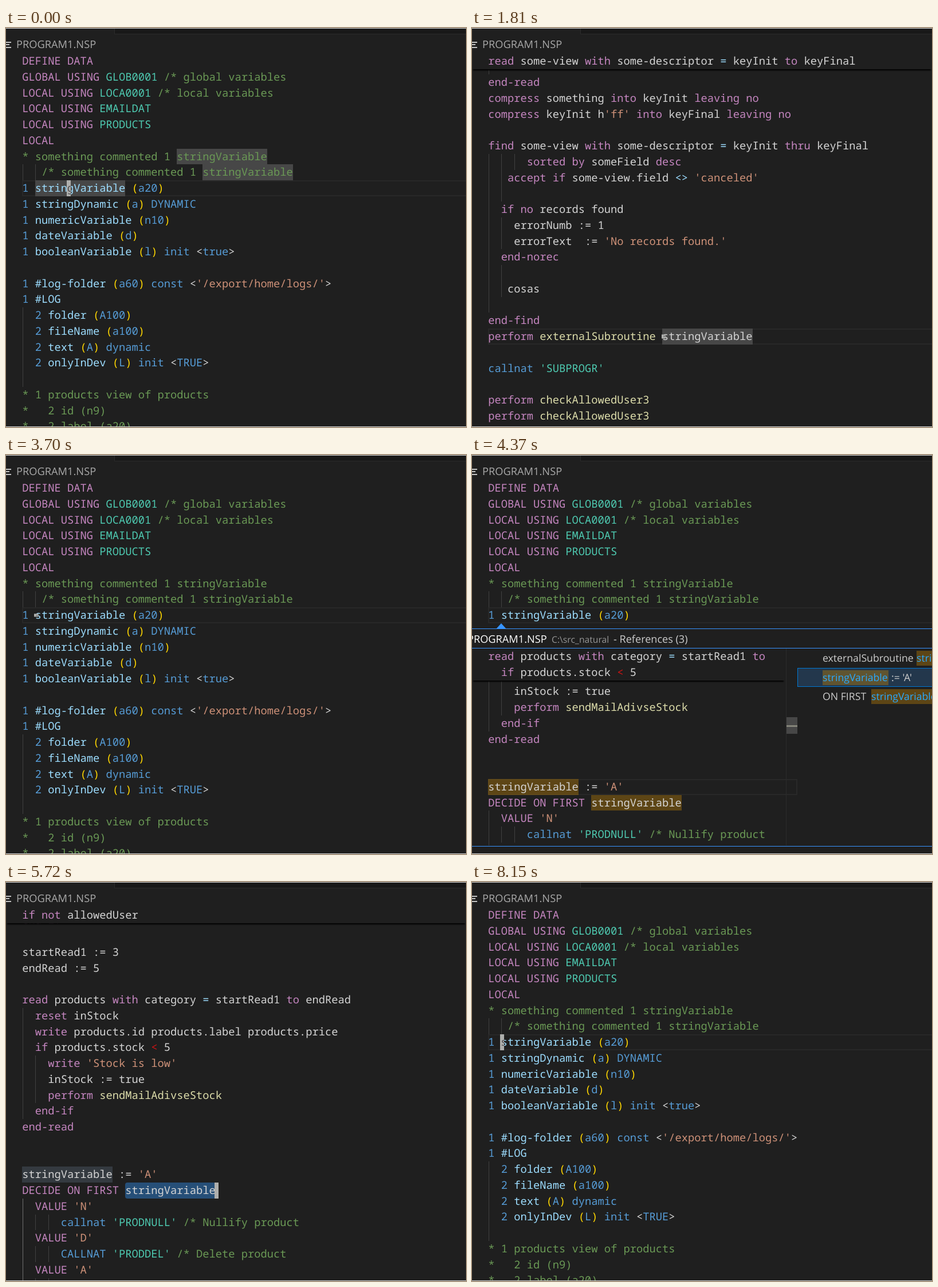
Write an HTML page that moves like this. It is 803 by 697 pixels and loops after 8350 ms.

```html
<!DOCTYPE html>
<html lang="en">
<head>
<meta charset="utf-8">
<title>Find references in an editor</title>
<style>
html, body { margin: 0; width: 100%; height: 100%; overflow: hidden; background: #1f1f1f; }
#stage { position: relative; width: 803px; height: 697px; overflow: hidden; background: #1f1f1f; color: #d4d4d4; }
#stage div, #stage span { position: absolute; box-sizing: border-box; white-space: pre; text-rendering: geometricPrecision; }
.row, .cursor { font: 500 18.75px/27.75px "Noto Sans Mono", monospace; }
.ui { font-family: "Open Sans", sans-serif; line-height: 30px; }
.pane { overflow: hidden; }
.k { color: #c586c0; }
.b { color: #569cd6; }
.v { color: #9cdcfe; }
.t { color: #4ec9b0; }
.s { color: #ce9178; }
.f { color: #dcdcaa; }
.c { color: #6a9955; }
.p { color: #ffd700; }
.r { color: rgba(255, 18, 18, .8); }
.guide { background: #404040; }
.active { background: #707070; }
.current { border: 2px solid #282828; }
.word { background: #474747; }
.same { background: #343a40; }
.selection { background: #264f78; border-radius: 4px; }
.jump { background: rgba(234, 92, 0, .333); }
.match { background: rgba(187, 128, 9, .4); }
.sticky { background: #1f1f1f; box-shadow: 0 4px 2px -2px #000; }
.cursor { background: #aeafad; color: #515052; padding-left: 1px; overflow: hidden; }
.tabs { background: #181818; border: solid #2b2b2b; border-width: 0 0 1px 1px; }
.edge { background: #d8d8d8; }
.icon { background: #c5c5c5; }
.peek { background: #1f1f1f; border: solid #3794ff; border-width: 1px 0; }
.title { border-bottom: 1px solid #3794ff; }
.ruler { border-left: 1px solid #2b2b2b; }
.slider { background: rgba(121, 121, 121, .45); }
.tick { background: #85857a; }
.picked { background: #23374c; border: 1px solid #0078d4; }
.arrow { background: #3794ff; clip-path: polygon(50% 0, 100% 100%, 0 100%); }
</style>
</head>
<body>
<div id="stage"></div>
<script>
const LOOP = 8350, CHAR = 11.25, LINE = 27.75, LEFT = 28.3;
const stage = document.getElementById('stage');

// Markup: "2|" = number of indent guides, x[...] = text in colour class x.
const declarations = [
  'k[DEFINE DATA]',
  'k[GLOBAL USING] t[GLOB0001] c[/* global variables]',
  'k[LOCAL USING] t[LOCA0001] c[/* local variables]',
  'k[LOCAL USING] t[EMAILDAT]',
  'k[LOCAL USING] t[PRODUCTS]',
  'k[LOCAL]',
  'c[* something commented 1 stringVariable]',
  '2|   c[/* something commented 1 stringVariable]',
  'b[1] v[stringVariable] p[(]b[a20]p[)]',
  'b[1] v[stringDynamic] p[(]b[a]p[)] b[DYNAMIC]',
  'b[1] v[numericVariable] p[(]b[n10]p[)]',
  'b[1] v[dateVariable] p[(]b[d]p[)]',
  'b[1] v[booleanVariable] p[(]b[l]p[)] b[init] <b[true]>',
  '',
  "b[1] v[#log-folder] p[(]b[a60]p[)] b[const] <s['/export/home/logs/']>",
  'b[1] v[#LOG]',
  '1|  b[2] v[folder] p[(]b[A100]p[)]',
  '1|  b[2] v[fileName] p[(]b[a100]p[)]',
  '1|  b[2] v[text] p[(]b[A]p[)] b[dynamic]',
  '1|  b[2] v[onlyInDev] p[(]b[L]p[)] b[init] <b[TRUE]>',
  '1|',
  'c[* 1 products view of products]',
  'c[*   2 id (n9)]',
  'c[*   2 label (a20)]'
];
const calls = [
  '1|',
  'k[end-read]',
  'k[compress] something k[into] keyInit k[leaving no]',
  "k[compress] keyInit hs['ff'] k[into] keyFinal k[leaving no]",
  '',
  'k[find] some-view k[with] some-descriptor v[=] keyInit k[thru] keyFinal',
  '3|      k[sorted by] someField k[desc]',
  "2|   k[accept if] some-view.field v[<>] s['canceled']",
  '2|',
  '1|  k[if no] records found',
  '2|    errorNumb := 1',
  "2|    errorText  := s['No records found.']",
  '1|  k[end-norec]',
  '2|',
  '2|   cosas',
  '1|',
  'k[end-find]',
  'k[perform] f[externalSubroutine] stringVariable',
  '',
  "b[callnat] t['SUBPROGR']",
  '',
  'k[perform] f[checkAllowedUser3]',
  'k[perform] f[checkAllowedUser3]'
];
const stock = [
  'k[end-if]',
  '',
  'startRead1 := 3',
  'endRead := 5',
  '',
  'k[read] products k[with] category v[=] startRead1 k[to] endRead',
  '1|  k[reset] inStock',
  '1|  k[write] products.id products.label products.price',
  '1|  k[if] products.stock r[<] 5',
  "2|    k[write] s['Stock is low']",
  '2|    inStock := true',
  '2|    k[perform] f[sendMailAdivseStock]',
  '1|  k[end-if]',
  'k[end-read]',
  '',
  '',
  "stringVariable := s['A']",
  'k[DECIDE ON FIRST] stringVariable',
  "1|  k[VALUE] s['N']",
  "3|      b[callnat] t['PRODNULL'] c[/* Nullify product]",
  "1|  k[VALUE] s['D']",
  "3|      b[CALLNAT] t['PRODDEL'] c[/* Delete product]",
  "1|  k[VALUE] s['A']",
  '3|'
];

function box(parent, cls, x, y, w, h, text = '') {
  const el = document.createElement('div');
  el.className = cls;
  el.style.cssText = `left:${x}px;top:${y}px;width:${w}px;height:${h}px`;
  el.textContent = text;
  return parent.appendChild(el);
}

function label(parent, x, middle, size, text, color) {
  const el = box(parent, 'ui', x, middle - 15, 300, 30, text);
  el.style.fontSize = size + 'px';
  el.style.color = color;
}

// Every block of code starts at `top`, the upper edge of its first row.
function code(parent, rows, top) {
  rows.forEach((row, i) => {
    const [, guides, markup] = row.match(/^(?:(\d)\|)?(.*)$/);
    for (let g = 0; g < (guides || 0); g++) guide(parent, top, i, 1, g, 'guide');
    const line = box(parent, 'row', LEFT, top + i * LINE, 0, LINE);
    let col = 0;
    for (const [, cls, colored, plain] of markup.matchAll(/([a-z])\[(.*?)\]|((?:(?![a-z]\[).)+)/g)) {
      const span = line.appendChild(document.createElement('span'));
      span.className = cls || '';
      span.textContent = colored || plain;
      span.style.left = col * CHAR + 'px';
      col += span.textContent.length;
    }
  });
}

function guide(parent, top, row, count, depth, cls) {
  return box(parent, cls, Math.round(28.6 + depth * 2 * CHAR), top + row * LINE, 1, count * LINE);
}

function mark(parent, cls, top, row, col, length = 14) {
  return box(parent, cls, LEFT + col * CHAR, top + row * LINE, length * CHAR, LINE);
}

function currentLine(parent, top, row, width = 800) {
  return box(parent, 'current', 28, top + row * LINE, width, LINE);
}

function play(el, frames) {
  el.animate(frames, { duration: LOOP, iterations: Infinity });
}

function during(el, ...spans) {
  const key = (time, opacity) => ({ offset: time / LOOP, opacity, easing: 'step-end' });
  const frames = spans.flatMap(([from, to]) => [key(from, 1), key(to, 0)]);
  if (spans[0][0] > 0) frames.unshift(key(0, 0));
  play(el, [...frames, key(LOOP, 0)]);
  return el;
}

// The caret folds to its middle and back, half a second for each way.
function cursor(parent, top, row, col, letter, from, to, blinkAt) {
  const el = box(parent, 'cursor', LEFT + col * CHAR - 1.4, top + row * LINE, 7, LINE, letter);
  during(el, [from, to]);
  if (!blinkAt) return;
  const key = (time, scale) =>
    ({ offset: Math.min(time / LOOP, 1), transform: `scaleY(${scale})`, easing: 'ease-in-out' });
  const frames = [key(0, 1)];
  let scale = 1;
  for (let time = blinkAt; time < to; time += 500) {
    frames.push(key(time, scale), key(time + 300, scale = 1 - scale));
  }
  play(el, [...frames, key(LOOP, scale)]);
}

function scene(...spans) {
  return during(box(stage, 'pane', 0, 44, 803, 652), ...spans);
}

function sticky(parent, rows, width) {
  const el = box(parent, 'sticky', 0, 0, width, rows.length * LINE);
  code(el, rows, 0);
  return el;
}

function buildDeclarations() {
  const view = scene([0, 70], [2900, 5720], [6800, LOOP]);
  const top = .1;
  currentLine(view, top, 8);
  [[6, 24], [7, 28], [8, 2]].forEach(([row, col]) => during(mark(view, 'word', top, row, col), [0, 70]));
  during(mark(view, 'jump', top, 8, 2), [2900, 3230], [6800, 7130]);
  code(view, declarations, top);
  cursor(view, top, 8, 7, 'g', 0, 70);
  cursor(view, top, 8, 2, 's', 2900, 3830, 3490);
  cursor(view, top, 8, 2, 's', 6800, LOOP, 7360);
}

function buildCalls() {
  const view = scene([70, 2900]);
  const top = 9.4;
  currentLine(view, top, 17);
  mark(view, 'word', top, 17, 27);
  code(view, calls, top);
  cursor(view, top, 17, 27, 's', 70, 2900, 615);
  sticky(view, ['k[read] some-view k[with] some-descriptor v[=] keyInit k[to] keyFinal'], 803);
}

function buildStock() {
  const view = scene([5720, 6800]);
  const top = 9.4;
  mark(view, 'same', top, 16, 0);
  mark(view, 'selection', top, 17, 16);
  code(view, stock, top);
  guide(view, top, 18, 6, 0, 'active');
  cursor(view, top, 17, 30, '', 5720, 6800, 6280);
  sticky(view, ['k[if not] allowedUser'], 803);
}

function buildPreview(peek) {
  const pane = box(peek, 'pane', 0, 34, 568, 344);

  const first = during(box(pane, 'pane', 0, 0, 568, 344), [3830, 4370]);
  const callsTop = 227.8 - 17 * LINE;
  currentLine(first, callsTop, 17, 540);
  mark(first, 'match', callsTop, 17, 27);
  code(first, calls, callsTop);
  during(sticky(first, ['k[find] some-view k[with] some-descriptor v[=] keyInit', calls[9].slice(2)], 546), [4100, 4370]);

  const second = during(box(pane, 'pane', 0, 0, 568, 344), [4370, 5720]);
  const stockTop = 227.8 - 16 * LINE;
  during(currentLine(second, stockTop, 16, 540), [4370, 4840]);
  during(currentLine(second, stockTop, 17, 540), [4840, 5720]);
  mark(second, 'match', stockTop, 16, 0);
  mark(second, 'match', stockTop, 17, 16);
  code(second, stock, stockTop);
  during(guide(second, stockTop, 18, 3, 0, 'active'), [4840, 5720]);
  sticky(second, ['k[read] products k[with] category v[=] startRead1 k[to]', stock[8].slice(2)], 546);

  box(pane, 'ruler', 548, 0, 20, 344);
  [[first, 80], [second, 120]].forEach(([view, y]) => {
    const slider = box(view, 'slider', 548, y, 20, 29);
    play(slider, [
      { offset: 0, opacity: 1 }, { offset: 5230 / LOOP, opacity: 1 },
      { offset: 5370 / LOOP, opacity: 0 }, { offset: 1, opacity: 0 }
    ]);
    box(view, 'tick', 548, y + 14, 20, 3);
  });
}

function buildList(peek) {
  [[3830, 4370], [4370, 4840], [4840, 5720]].forEach((span, i) =>
    during(box(peek, 'picked', 568, 34.6 + i * 33.4, 260, 33.4), span));
  const word = (x, middle) => {
    box(peek, 'match', x, middle - 13, 115, 26);
    label(peek, x, middle, 17.7, 'stringVariable', '#2aaaff');
  };
  const plain = (x, middle, text) => label(peek, x, middle, 17.7, text, '#cccccc');
  plain(612, 51, 'externalSubroutine');
  word(776, 51);
  word(612, 85);
  plain(732, 85, ":= 'A'");
  plain(612, 118, 'ON FIRST');
  word(697, 118);
}

function buildPeek() {
  const layer = during(box(stage, 'pane', 0, 294, 803, 402), [3830, 5720]);
  layer.style.background = '#1f1f1f';
  box(layer, 'arrow', 42, 0, 18, 10);
  const peek = box(layer, 'peek pane', 0, 9, 803, 381);
  box(peek, 'title', 0, 0, 803, 34);
  label(peek, -8, 17.5, 18.2, 'PROGRAM1.NSP', '#ffffff');
  label(peek, 139, 18, 15.7, 'C:\\src_natural', '#969696');
  label(peek, 247, 17.5, 18.1, '- References (3)', '#cccccc');
  buildPreview(peek);
  buildList(peek);
}

function buildFrame() {
  box(stage, 'tabs', 189, 0, 614, 11);
  [[24, 9], [28, 6], [33, 9]].forEach(([y, w]) => box(stage, 'icon', 0, y, w, 1.5));
  label(stage, 18, 28.5, 18.25, 'PROGRAM1.NSP', '#a9a9a9');
  box(stage, 'edge', 0, 0, 803, 1);
  box(stage, 'edge', 0, 696, 803, 1);
}

buildDeclarations();
buildCalls();
buildStock();
buildPeek();
buildFrame();
</script>
</body>
</html>
```
